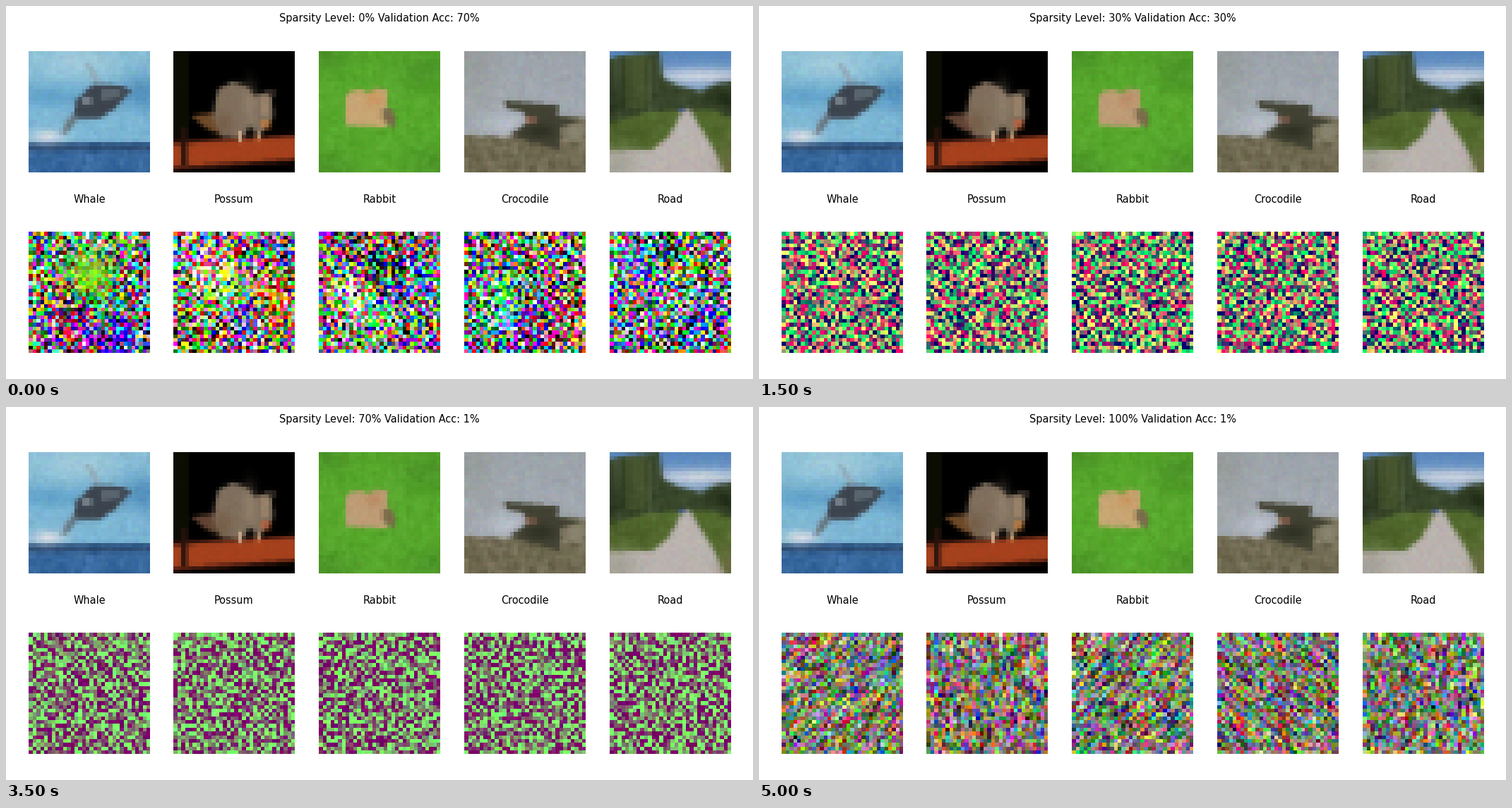
These frames come from a looping animation (1058 by 529 pixels, 5500 ms). A matplotlib script:

```python
import numpy as np
import matplotlib.pyplot as plt
from matplotlib.animation import FuncAnimation
from matplotlib.path import Path

WIDTH, HEIGHT, DPI = 1058, 529, 92
CELLS, SIDE = 32, 172
TOP_ROW, BOTTOM_ROW = 64, 320
LABELS = ("Whale", "Possum", "Rabbit", "Crocodile", "Road")
LEFTS = [int(32 + 205.75 * i) for i in range(len(LABELS))]
ACCURACY = (70, 58, 44, 30, 18, 6, 2, 1, 1, 0, 1)
FONT = dict(family="DejaVu Sans", size=11.4, ha="center", va="baseline")

SUB = 4
axis = (np.arange(CELLS * SUB) + .5) / SUB
SAMPLES = np.stack(np.meshgrid(axis, axis), -1).reshape(-1, 2)
ROWS, COLS = np.mgrid[:CELLS, :CELLS] + .5
ENLARGE = (np.arange(SIDE) * CELLS) // SIDE


def flat(*color):
    return np.full((CELLS, CELLS, 3), color, float)


def fade(top, bottom):
    return mix(flat(*top), flat(*bottom), ROWS[..., None] / CELLS)


def mix(start, end, amount):
    return np.array(start) * (1 - amount) + np.array(end) * amount


def paint(img, color, *points, alpha=1):
    """Blend an anti-aliased polygon into the small image."""
    inside = Path(points).contains_points(SAMPLES).astype(float)
    cover = inside.reshape(CELLS, SUB, CELLS, SUB).mean(axis=(1, 3))
    img += alpha * cover[..., None] * (np.array(color) - img)


def box(img, color, left, top, right, bottom, alpha=1):
    paint(img, color, (left, top), (right, top), (right, bottom),
          (left, bottom), alpha=alpha)


def glow(img, color, x, y, rx, ry, alpha=1):
    shape = alpha * np.exp(-((COLS - x) / rx) ** 2 - ((ROWS - y) / ry) ** 2)
    img += shape[..., None] * (np.array(color) - img)


def soften(img, amount):
    pad = np.pad(img, ((1, 1), (1, 1), (0, 0)), "edge")
    around = (pad[:-2, 1:-1] + pad[2:, 1:-1] + pad[1:-1, :-2] + pad[1:-1, 2:]) / 4
    return mix(img, around, amount)


def grain(img, seed, amount, top=0, bottom=CELLS):
    noise = np.random.default_rng(seed).normal(0, amount, (CELLS, CELLS, 1))
    img[top:bottom] += soften(noise, .5)[top:bottom]


def whale(warm):
    img = fade((136, 190, 214), (120, 180, 213))
    glow(img, (172, 209, 222), 13, 3, 10, 4, .7)
    glow(img, (90, 157, 199), 6, 12, 14, 3, .8)
    glow(img, (72, 135, 184), 30, 11, 6, 5, .8)
    box(img, (55, 104, 158), 0, 24, 32, 32)
    box(img, (45, 76, 114), 0, 24.5, 32, 26.3)
    grain(img, 1, 5)
    grain(img, 2, 8, top=24)
    paint(img, (145, 170, 184), (14.8, 3), (16, 3), (19, 8), (17.6, 8.6))
    paint(img, (60, 68, 78), (8.3, 21.5), (12, 16), (12.4, 12.8), (17, 8.6),
          (24.5, 9), (27, 10.3), (22.5, 15.3), (18.5, 17.8), (12.6, 17.8), (9.5, 22))
    paint(img, (104, 118, 128), (19, 10), (24.5, 10), (24, 12), (19, 13), alpha=.7)
    box(img, (165, 175, 182), 14, 12, 16.5, 14, .6)
    paint(img, (125, 145, 158), (9, 18.5), (12, 16), (13, 18), (9, 22), alpha=.6)
    glow(img, (226, 224, 228), 5, 22.5, 4.5, 1.8, .9)
    return soften(img, .25)


def possum(warm):
    img = flat(0, 0, 0)
    box(img, (12, 13, 3), 0, 0, 4, 23)
    paint(img, (62, 24, 15), (0, 23.5), (32, 21.8), (32, 29), (0, 31.5))
    paint(img, (166, 65, 29), (0, 24.5), (32, 22.4), (32, 28.3), (0, 30.4))
    box(img, (38, 18, 12), 2, 20, 3.5, 30)
    paint(img, mix((88, 62, 60), (112, 74, 40), warm), (4.5, 17), (12, 16),
          (13, 22), (9, 20.5))
    paint(img, (128, 111, 93), (10.8, 14), (11.5, 10), (15.5, 8), (18.5, 8.8),
          (21.5, 11.5), (26, 10.2), (26.2, 17.5), (22.5, 22.5), (20, 19.5),
          (18, 23), (12.5, 22.3), (10.5, 18))
    glow(img, (155, 137, 116), 20, 14, 1.8, 5, .6)
    glow(img, (112, 84, 60), 13, 19, 2.5, 3, .6)
    box(img, (176, 148, 116), 23, 12, 25, 17, .5)
    box(img, (42, 34, 28), 25.3, 10, 27, 12)
    box(img, mix((200, 75, 55), (205, 130, 62), warm), 23, 18, 25.6, 20.5, .7)
    box(img, (214, 178, 146), 17, 21, 18, 24)
    box(img, (208, 164, 120), 21.8, 21.5, 23, 23.3)
    return soften(img, .25)


def rabbit(warm):
    img = flat(87, 168, 44)
    for x, y in ((2, 1), (28, 5), (3, 31), (30, 30)):
        glow(img, (70, 137, 38), x, y, 7, 5, .6)
    grain(img, 5, 6)
    paint(img, mix((184, 150, 120), (200, 166, 116), warm), (7, 12), (8, 10.5),
          (11, 10), (13, 11), (15, 9.8), (18, 10), (18, 20), (7, 19.5))
    glow(img, mix((175, 128, 98), (202, 142, 86), warm), 14.5, 12.5, 2.2, 2, .7)
    paint(img, (122, 108, 75), (16.8, 15), (19, 15), (20, 17), (20, 20.5), (16.8, 18))
    return soften(img, .3)


def crocodile(warm):
    img = fade((157, 164, 172), (170, 176, 182))
    glow(img, (150, 155, 152), 2, 3, 6, 12, .7)
    glow(img, (188, 195, 206), 11, 19, 5, 3, .8)
    grain(img, 7, 4)
    paint(img, (113, 107, 83), (0, 22), (12, 22.5), (20, 20), (25, 17),
          (32, 17.5), (32, 32), (0, 32))
    glow(img, (150, 145, 125), 29, 21, 4, 3, .7)
    grain(img, 8, 13, top=22)
    paint(img, (66, 66, 51), (10.5, 13), (25, 14.2), (24.5, 17), (31, 18),
          (25, 20), (25, 26), (16, 23.5), (12, 22), (17, 18.5), (15.5, 16), (11, 15))
    glow(img, (38, 42, 29), 20, 21, 4, 2, .7)
    box(img, mix((128, 92, 75), (158, 106, 88), warm), 16, 17, 19, 19, .6)
    return soften(img, .25)


def road(warm):
    img = fade((88, 135, 190), (215, 220, 225))
    glow(img, (214, 219, 225), 24, 6.5, 14, 2, .9)
    paint(img, (56, 70, 42), (0, 2), (3, 1), (13, 0), (14, 7), (18, 9),
          (24, 10.5), (28, 8.5), (32, 8), (32, 32), (0, 32))
    stripes = np.random.default_rng(11).normal(0, 9, 14)
    img[2:17, :14] += stripes[:, None]
    box(img, (92, 106, 54), 4, 1, 10, 15, .4)
    glow(img, (34, 45, 25), 1, 13, 4, 6, .6)
    glow(img, (33, 44, 24), 31, 12.5, 5, 3, .8)
    paint(img, (83, 106, 46), (0, 19), (10, 16), (27, 15.5), (32, 17.5),
          (32, 32), (0, 32))
    glow(img, (66, 82, 33), 4, 21, 6, 2.5, .6)
    grain(img, 12, 7, top=9)
    paint(img, (186, 179, 175), (19.3, 15.3), (21, 15.3), (27.5, 26), (30.3, 32),
          (0, 32), (0, 26.2), (11, 26), (15.5, 22.5))
    glow(img, (158, 157, 145), 2, 30, 5, 4, .8)
    glow(img, (112, 106, 70), 32, 30, 3, 5, .8)
    box(img, (68, 92, 150), 18, 15, 20, 16, .8)
    return soften(img, .4)


SCENES = (whale, possum, rabbit, crocodile, road)
COLD = [scene(0) for scene in SCENES]
WARM = [scene(1) for scene in SCENES]


def photo(panel, step):
    img = mix(COLD[panel], WARM[panel], abs(step - 5) / 5)
    rng = np.random.default_rng(500 + 10 * step + panel)
    img = img * rng.normal(1, .015, img.shape)
    return np.clip(img / 255, 0, 1)


def drift(img, rng, channels):
    """Add a few broad colour clouds."""
    for _ in range(6):
        x, y = rng.uniform(2, 30, 2)
        shift = rng.normal(0, .25, 3) * channels
        cloud = np.exp(-((COLS - x) ** 2 + (ROWS - y) ** 2) / 40)
        img += cloud[..., None] * shift


def saliency(panel, step):
    """Red and blue drop out in the middle of the run and return at its end."""
    rng = np.random.default_rng(1000 + 10 * step + panel)
    noise = rng.normal(size=(CELLS, CELLS, 3))
    late = step > 8
    channels = np.array((late or step < 5, True, late or step == 0), float)
    if late:
        direction = rng.integers(-1, 2, 2)
        noise = .95 * noise + .3 * np.roll(noise, direction, (0, 1))
    else:
        noise = 1.1 * soften(noise, -.3)
    spread = np.maximum(channels * (.25 if late else .42), .025)
    img = np.array((.49, .48, .42)) + noise * spread
    if step < 3:
        drift(img, rng, channels)
    if step == 0 and panel == 0:
        glow(img, (.55, .9, .1), 16, 11, 7, 7, .8)
    return np.clip(img, 0, 1)


def enlarge(img):
    return img[ENLARGE][:, ENLARGE]


def add_panel(left, top):
    return fig.figimage(np.zeros((SIDE, SIDE, 3)), xo=left,
                        yo=HEIGHT - top - SIDE, origin="upper")


fig = plt.figure(figsize=(WIDTH / DPI, HEIGHT / DPI), dpi=DPI, facecolor="white")
title = fig.text(.5, 1 - 21.5 / HEIGHT, "", **FONT)
photos = [add_panel(left, TOP_ROW) for left in LEFTS]
maps = [add_panel(left, BOTTOM_ROW) for left in LEFTS]
for left, label in zip(LEFTS, LABELS):
    fig.text((left + SIDE / 2) / WIDTH, 1 - 279 / HEIGHT, label, **FONT)


def update(step):
    title.set_text(f"Sparsity Level: {10 * step}% Validation Acc: {ACCURACY[step]}%")
    for panel in range(len(LABELS)):
        photos[panel].set_data(enlarge(photo(panel, step)))
        maps[panel].set_data(enlarge(saliency(panel, step)))
    return [title, *photos, *maps]


animation = FuncAnimation(fig, update, frames=len(ACCURACY), interval=500,
                          repeat=True, repeat_delay=0, blit=False)
plt.show()
```
